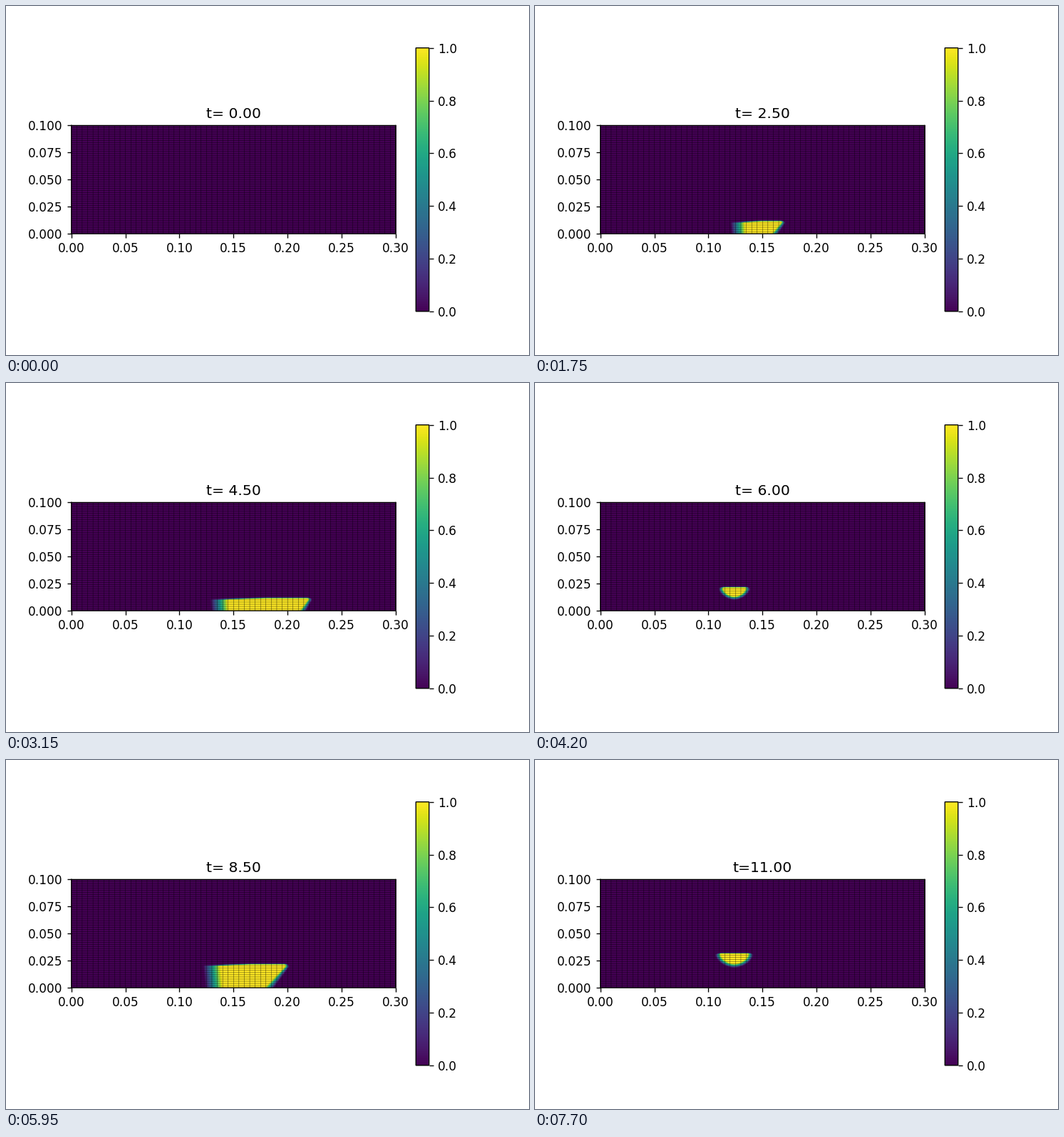
Recreate the animation shown at these times as a matplotlib script. Size 734 by 489 pixels, loop 8000 ms.

```python
import numpy as np
import matplotlib.pyplot as plt
from matplotlib.animation import FuncAnimation
from matplotlib.collections import LineCollection

DPI = 734 / 6
LX, LY = 0.3, 0.1      # domain size
NX, NY = 60, 50        # mesh cells
PERIOD = 5.0           # seconds per deposited layer
DT = 0.5
TICK, HOLD, FRAMES = 50, 7, 160

plt.rcParams.update({"font.family": "DejaVu Sans", "font.size": 10,
                     "figure.subplot.bottom": 0.125, "path.snap": False})

xs = (np.arange(240) + 0.5) * LX / 240
ys = (np.arange(200) + 0.5) * LY / 200
X, Y = np.meshgrid(xs, ys)


def ramp(v):
    return np.clip(v, 0, 1)


def surface(top, left, right, tail):
    """Cut the pool at the top, lower towards the tail and the tip."""
    sag = 0.0014 * ramp((left + tail - X) / tail)
    sag += 0.0018 * ramp((X - right + 0.005) / 0.005) ** 2
    return ramp((top + 0.0008 - sag - Y) / 0.001)


def young_pool(tau, layer, top):
    """Bowl-shaped pool shortly after the beam starts."""
    grow = 0.003 * (layer - 1)
    right = np.interp(tau, [1, 2.5], [0.138 + grow, 0.1775 + 0.5 * grow])
    left = np.interp(tau, [1, 2.5], [0.109 - grow, 0.1195])
    depth = np.interp(tau, [1, 1.5, 2], [0.0115, 0.0165, 0.024]) + 0.5 * grow
    mid, half = (left + right) / 2, (right - left) / 2
    d = np.maximum(top - Y, 0)
    r = (np.abs((X - mid) / half) ** 1.8 + (d / depth) ** 1.8) ** (1 / 1.8)
    return ramp((1 - r) / 0.27) * surface(top, left, right, 0.005)


def long_pool(tau, layer, top):
    """Pool that reaches the floor: slanted front, slowly freezing tail."""
    k = (tau - 2.5) / 2
    if layer == 0:
        tip, drop = 0.1705 + 0.0515 * k, 0.0065 - 0.001 * k
        left, soft, lean = 0.1265 + 0.0095 * k, 0.013 + 0.003 * k, 0.001
    else:
        tip, drop = 0.178 + 0.0455 * k, 0.0125 + 0.003 * k
        left, soft, lean = 0.1245 + 0.0095 * k, 0.0125 + 0.0065 * k, 0.0045 * (1 - k)
    d = np.maximum(top - Y, 0)
    back = ramp((X - left - lean * d / top) / soft + 0.5)
    slope = drop * ramp((d / top - 0.1) / 0.9)
    front = ramp((tip - slope - X) / (0.003 + 0.25 * d))
    return back * front * surface(top, left, tip, (tip - left) / 2)


def melt(t):
    layer = max(int(np.ceil(t / PERIOD)) - 1, 0)
    tau = t - layer * PERIOD
    top = 0.0115 + 0.01 * layer
    if tau < 1:
        return np.zeros_like(X)
    pool = young_pool if tau < 2.5 else long_pool
    return pool(tau, layer, top)


# a hair over the pixel size so that truncation keeps 734 x 489
fig, ax = plt.subplots(figsize=(734.001 / DPI, 489.001 / DPI), dpi=DPI)
img = ax.imshow(melt(0), origin="lower", extent=(0, LX, 0, LY), cmap="viridis",
                vmin=0, vmax=1, interpolation="bilinear")
mesh = [[(x, 0), (x, LY)] for x in np.linspace(0, LX, NX + 1)]
mesh += [[(0, y), (LX, y)] for y in np.linspace(0, LY, NY + 1)]
ax.add_collection(LineCollection(mesh, colors="k", linewidths=0.2), autolim=False)
ax.set_xlim(0, LX)
ax.set_ylim(0, LY)
ax.set_xticks(np.linspace(0, LX, 7))
ax.set_yticks(np.linspace(0, LY, 5))
title = ax.set_title("t= 0.00", fontsize=12)
fig.colorbar(img, ax=ax)


def update(i):
    t = i // HOLD * DT
    img.set_data(melt(t))
    title.set_text(f"t={t:5.2f}")
    return img, title


anim = FuncAnimation(fig, update, frames=FRAMES, interval=TICK, repeat=True)
plt.show()
```
